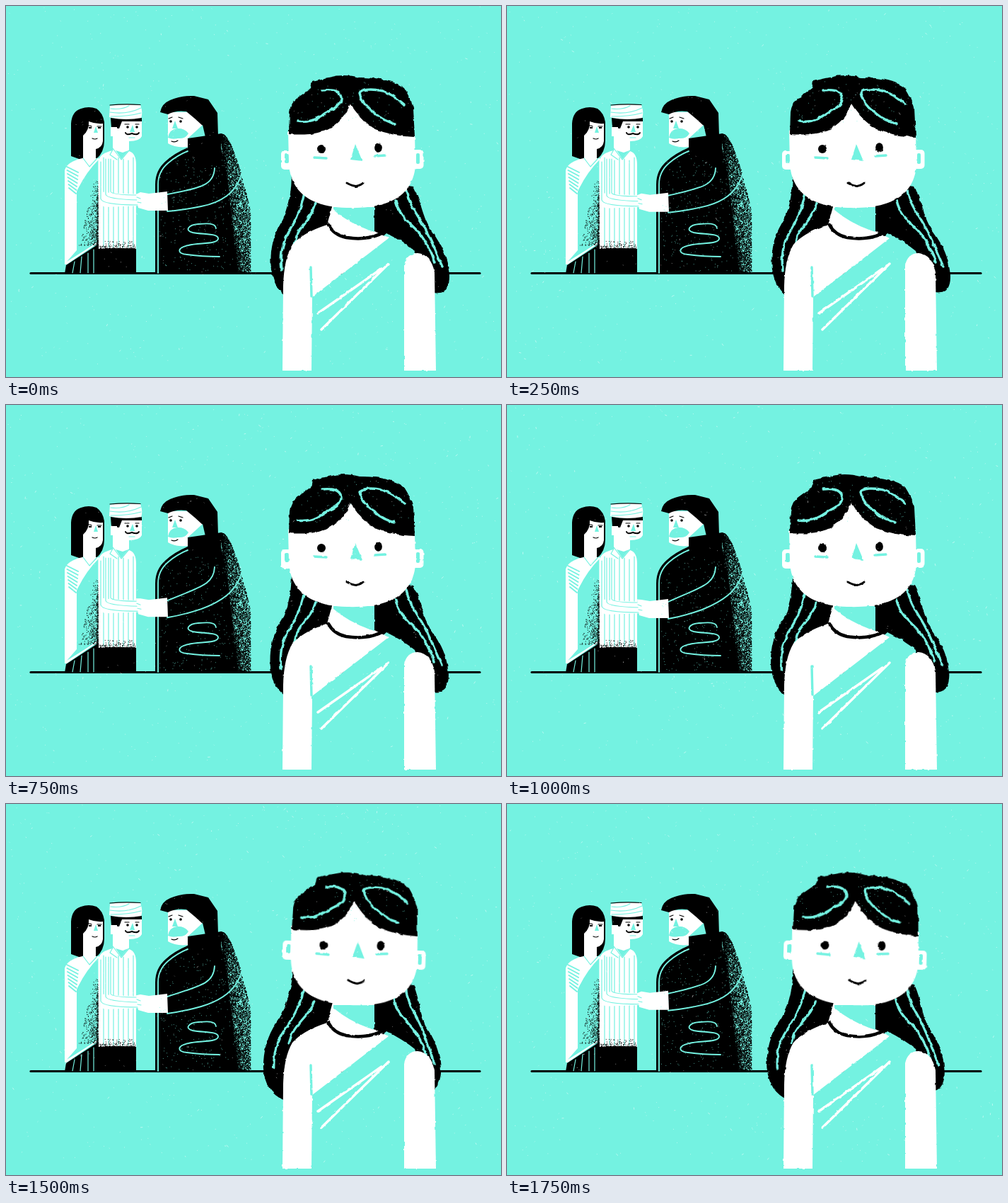
An HTML page that plays this animation: 700 px wide and 524 px high, repeating every 2000 ms.

```html
<!DOCTYPE html>
<html lang="en">
<head>
<meta charset="utf-8">
<title>Handshake</title>
<style>
  html, body { margin: 0; width: 100%; height: 100%; overflow: hidden; background: #74f2e1; }
  svg { display: block; width: 700px; height: 524px; }
  .k { fill: #000; }
  .w { fill: #fff; }
  .t { fill: #74f2e1; }
  .kl, .wl, .tl { fill: none; stroke-linecap: round; stroke-linejoin: round; }
  .kl { stroke: #000; }
  .wl { stroke: #fff; }
  .tl { stroke: #74f2e1; }
  .thin { stroke-width: 1.2; }
  .mid { stroke-width: 1.9; }
  .bold { stroke-width: 3.4; }
</style>
</head>
<body>
<svg viewBox="0 0 700 524">
  <defs id="defs"></defs>
  <rect class="t" width="700" height="524"/>

  <g filter="url(#fine)">
    <path class="kl" stroke-width="3.2" d="M35 377.5H670"/>

    <!-- woman -->
    <path class="k" d="M92 212V166Q93 149 106 145Q117 141 128 145Q137 151 139 164V190Q139 206 128 216L106 217Z"/>
    <path class="w" d="M109 216V183Q118 175 117 163Q127 167 137 166V191Q136 200 127 202V218Z"/>
    <path class="kl thin" d="M114 170Q118 168 121 170M129 170H135M122 187Q126 189 129 187"/>
    <path class="k" d="M117 171h4v2h-4zM130 171h4v2h-4z"/>
    <path class="t" d="M127 170L124 179H130Z"/>
    <path class="w" d="M83 365V232Q86 220 108 215H131V334L86 365Z"/>
    <path class="t" d="M131 217V333L86 361L100 345V262Q112 236 131 217Z"/>
    <path class="tl thin" d="M109 215L118 227L129 215"/>
    <path class="tl mid" id="sleeve"/>
    <path class="wl thin" d="M131 216V333L85 364"/>
    <path class="k" d="M83 378L85 366L131 336V378Z"/>
    <path class="tl thin" d="M97 361L94 377M107 354L105 377M116 349V377M124 344V377"/>

    <!-- man in the turban -->
    <path class="w" d="M131 347V218Q133 208 151 204V160H192V184Q189 191 174 191V205Q184 208 184 224V347Z"/>
    <path class="w" d="M147 141Q168 137 190 140Q194 150 191 159Q168 163 146 157Z"/>
    <path class="kl thin" d="M147 140Q168 138 190 139.5"/>
    <path class="tl thin" d="M147 150Q170 154 191 144M148 145Q163 147 174 141M148 156Q174 156 191 151"/>
    <path class="k" d="M148 158Q170 162 192 158V163L164 163L160 173L149 172Z"/>
    <path class="w" d="M148 171H157V184H148Z"/>
    <circle class="k" cx="172" cy="171" r="1.8"/><circle class="k" cx="185" cy="171" r="1.8"/>
    <path class="kl thin" d="M168 167H174M183 167H188"/>
    <path class="t" d="M179 168L175 178H182Z"/>
    <path class="kl mid" d="M169 179Q170 183 178 180Q186 183 188 179"/>
    <path class="tl thin" d="M174 186H182M151 201L163 217L174 204M151 203L147 210L157 217"/>
    <path class="t" d="M155 204L163 216L173 204L165 207Z"/>
    <path class="tl thin" id="stripes"/>
    <path class="k" d="M131 343Q158 341 184 343V378H131Z"/>
    <path class="kl" stroke-width="1" id="dust"/>

    <!-- man in the coat -->
    <path class="w" d="M229 150H279V180L258 199Q240 201 229 194Z"/>
    <path class="k" d="M218 150Q220 138 232 133Q248 126 266 127L286 132L299 151L300 184L278 186L278 169L267 159L255 149Q240 147 229 153Z"/>
    <path class="t" d="M256 188L278 168L282 185Z"/>
    <path class="t" d="M229 186Q231 174 242 173Q252 172 258 180Q254 188 243 187Q235 189 229 186Z"/>
    <path class="t" d="M239 162L235 173H243Z"/>
    <circle class="k" cx="233" cy="163" r="1.8"/><circle class="k" cx="247" cy="163" r="1.8"/>
    <path class="kl thin" d="M230 159L235 157M244 157L250 159M234 191Q239 193 243 190"/>
    <path class="k" d="M211 378V252Q211 232 226 219Q238 208 257 200V187L305 180L304 200Q312 230 315 260Q320 310 328 378Z"/>
    <path class="kl" stroke-width="1.2" id="stipple"/>
    <path class="tl mid" d="M215 377V252Q215 234 229 222Q242 211 257 205"/>
    <path class="tl mid" d="M297 314C296 306 284 307 272 308C258 309 252 317 264 320C280 323 301 321 300 329C298 337 272 334 258 338C242 341 241 350 256 351Q277 354 302 354"/>

    <!-- joined arms -->
    <path class="w" id="forearm"/>
    <path class="tl thin" id="cuff"/>
    <path class="k" id="coatSleeve"/>
    <path class="tl mid" id="armLines"/>
    <path class="w" id="hand"/>
    <path class="tl thin" id="fingers"/>
  </g>

  <!-- girl -->
  <g filter="url(#wavy)">
    <g id="hair">
      <path class="k" d="M404 232C404 262 400 290 388 308C376 328 373 350 375 372Q380 406 408 418L420 330H560L604 405Q628 409 627 380C624 350 614 335 600 315C588 295 588 278 576 255Z"/>
      <path class="tl bold" d="M422 264C416 292 409 304 400 319C389 338 388 354 390 373M438 279C432 300 418 307 411 325L408 338M566 261C570 282 584 297 593 315C603 334 609 350 617 368M551 275C557 300 575 308 587 324Q600 342 606 362"/>
    </g>
  </g>
  <g filter="url(#rough)">
    <path class="t" d="M430 420L538 321Q562 333 578 346L590 380V524H430Z"/>
    <path class="w" d="M462 280H521V318L541 328L433 411L432 515H391L392 395Q393 357 405 337Q420 320 454 309Z"/>
    <path class="w" d="M563 515V366Q567 349 582 349Q601 351 606 376L608 515Z"/>
    <path class="t" d="M463 284H521V319Q488 309 463 288Z"/>
    <path class="tl bold" d="M431 369L432 410"/>
    <path class="kl" stroke-width="4.5" d="M456 309Q463 323 481 327Q513 332 535 319"/>
    <path class="wl bold" d="M441 434L531 371M446 457L541 364"/>
  </g>
  <g id="head">
    <g filter="url(#rough)">
      <g id="earL">
        <rect class="w" x="389" y="204" width="20" height="27" rx="5"/>
        <rect class="t" x="394" y="209" width="6" height="13" rx="2"/>
      </g>
      <g id="earR">
        <rect class="w" x="570" y="203" width="20.5" height="27" rx="5"/>
        <rect class="t" x="580" y="208" width="5" height="15" rx="2"/>
      </g>
      <path class="w" d="M399 176L400 222C402 262 430 284 482 285C542 287 575 268 579 226L578 180L490 125Z"/>
      <circle class="k" cx="446" cy="202" r="6"/>
      <ellipse class="k" cx="526.5" cy="200" rx="5.4" ry="6.8"/>
      <path class="t" d="M494 195L487 217L504 219Z"/>
      <path class="tl bold" d="M436 214L453 215M521 212L536 211"/>
      <path class="kl" stroke-width="3" d="M482 250Q489 254 495 254.500Q502 253 505 250"/>
    </g>
    <g filter="url(#wavy)">
      <path class="k" d="M400 181L401 150Q403 136 412 130L431 116L433 106Q450 102 468 98.500Q486 97 500 101Q544 101 563 116Q572 130 576 144L578 185Q547 184 522 174Q500 160 487 138Q479 160 460 172Q440 184 400 181Z"/>
      <path class="tl bold" d="M413 163C432 166 446 156 456 149C469 143 475 136 474 129C471 118 459 118 447 119M563 139Q548 125 532 120C520 117 501 117 500 123Q503 139 522 152Q535 163 550 166"/>
    </g>
  </g>
  <path class="wl" id="specks" stroke-width="1" stroke-opacity=".5"/>
  <path class="tl" id="flecks" stroke-width="1" stroke-opacity=".7"/>
</svg>

<script>
const STEP = 250, COUNT = 8;
const SWAY = [0, 0, 0, -1, -1.5, -9, -11, -7.5];   // sideways swing of the loose hair
const $ = id => document.getElementById(id);
const setD = (id, d) => $(id).setAttribute('d', d);
const range = (n, f) => Array.from({ length: n }, (_, i) => f(i)).join('');

function seeded(seed) {
  let s = seed * 7919 + 17;
  return () => {
    s = (s + 0x6D2B79F5) | 0;
    let v = Math.imul(s ^ (s >>> 15), 1 | s);
    v = (v + Math.imul(v ^ (v >>> 7), 61 | v)) ^ v;
    return ((v ^ (v >>> 14)) >>> 0) / 4294967296;
  };
}

const dot = (x, y, dx = 0.1, dy = 0) =>
  `M${x.toFixed(1)} ${y.toFixed(1)}l${dx.toFixed(1)} ${dy.toFixed(1)}`;

// Hand-drawn edges: name, noise frequency, displacement
const FILTERS = [['fine', 0.14, 1.1], ['rough', 0.13, 2.6], ['wavy', 0.11, 4.2]];
$('defs').innerHTML = FILTERS.map(([id, freq, scale]) => `
  <filter id="${id}" filterUnits="userSpaceOnUse" x="0" y="0" width="700" height="524"
    color-interpolation-filters="sRGB">
    <feTurbulence type="fractalNoise" baseFrequency="${freq}" numOctaves="2"/>
    <feDisplacementMap in="SourceGraphic" scale="${scale}" xChannelSelector="R" yChannelSelector="G"/>
  </filter>`).join('');
const noises = document.querySelectorAll('feTurbulence');

function drawStatic() {
  setD('sleeve', range(7, i => `M${86 + i / 2} ${227 + i * 5}L${102 - i / 2} ${235 + i * 5}`));
  setD('stripes', range(7, i => `M${138 + i * 7} ${214 + (i % 3) * 2}V341`));

  // Grain fades from the solid coat to a curved outer edge
  const rnd = seeded(3);
  setD('stipple', range(5200, () => {
    const y = 181 + 196 * rnd();
    const inner = 303 + (y - 181) * 0.125;
    const outer = 306 + 40 * Math.min(1, (y - 181) / 110) ** 0.6;
    return dot(inner + (outer - inner) * rnd() ** 1.5, y);
  }));
  setD('dust', range(600, () => {
    const y = 245 + 95 * Math.sqrt(rnd());
    return dot(130 - 27 * rnd() ** 3 * (y - 225) / 115, Math.min(y, 338));
  }) + range(200, () => dot(132 + 51 * rnd(), 343 - 11 * rnd() ** 3)));
}

function drawArms(a) {
  setD('forearm', `M133 ${262 + a}L147 ${264 + a}L192 ${266 + a}V${282 + a}L140 ${284 + a}Q132 ${282 + a} 133 ${262 + a}Z`);
  setD('cuff', `M148 216V${262 + a}Q149 ${267 + a} 188 ${267 + a}` +
    `M141 216V${266 + a}Q142 ${273 + a} 188 ${274 + a}` +
    `M134 220V${272 + a}Q135 ${281 + a} 188 ${281 + a}`);
  setD('coatSleeve', `M227 ${264 + a}L262 ${256 + a / 2}L270 286L227 ${289 + a}Z`);
  setD('armLines', `M295 229C294 254 274 257 228 ${266 + a}` +
    `M333 237C326 264 303 278 276 ${283 + a / 2}Q252 ${288 + a * 0.8} 228 ${290 + a}`);
  setD('hand', `M184 ${266 + a * 0.7}L190 ${263 + a}L202 ${265 + a}L228 ${262 + a}L229 ${289 + a}L201 ${289 + a}L187 ${285 + a}Z`);
  setD('fingers', `M185 ${270 + a}L190 ${272 + a}M186 ${277 + a}L191 ${278 + a}`);
}

function drawGrain(step) {
  const rnd = seeded(step + 40);
  setD('specks', range(650, () => {
    const long = rnd() < 0.12 ? 5 : 0.6;
    return dot(3 + 693 * rnd(), 1 + 505 * rnd(), (rnd() - 0.5) * long, (rnd() - 0.5) * long);
  }));
  setD('flecks', range(230, () => dot(217 + 105 * rnd(), 215 + 160 * rnd())) +
    range(60, () => dot(410 + 160 * rnd(), 106 + 60 * rnd())));
}

function draw(step) {
  const tilted = step >= 5;
  const k = SWAY[step] / 115;
  drawArms(6 - 6 * Math.cos(step / COUNT * 2 * Math.PI));
  drawGrain(step);
  $('hair').setAttribute('transform', `matrix(1 0 ${k} 1 ${-255 * k} 0)`);
  $('head').setAttribute('transform', tilted ? 'translate(1.8 -1) rotate(1.9 490 250)' : '');
  $('earL').setAttribute('transform', tilted ? 'translate(-1 -7)' : '');
  $('earR').setAttribute('transform', tilted ? 'translate(0 2)' : '');
  noises.forEach(n => n.setAttribute('seed', step + 2));
}

let shown = -1;
function tick() {
  const step = Math.floor(performance.now() / STEP) % COUNT;
  if (step !== shown) draw(shown = step);
  requestAnimationFrame(tick);
}

drawStatic();
tick();
</script>
</body>
</html>
```
